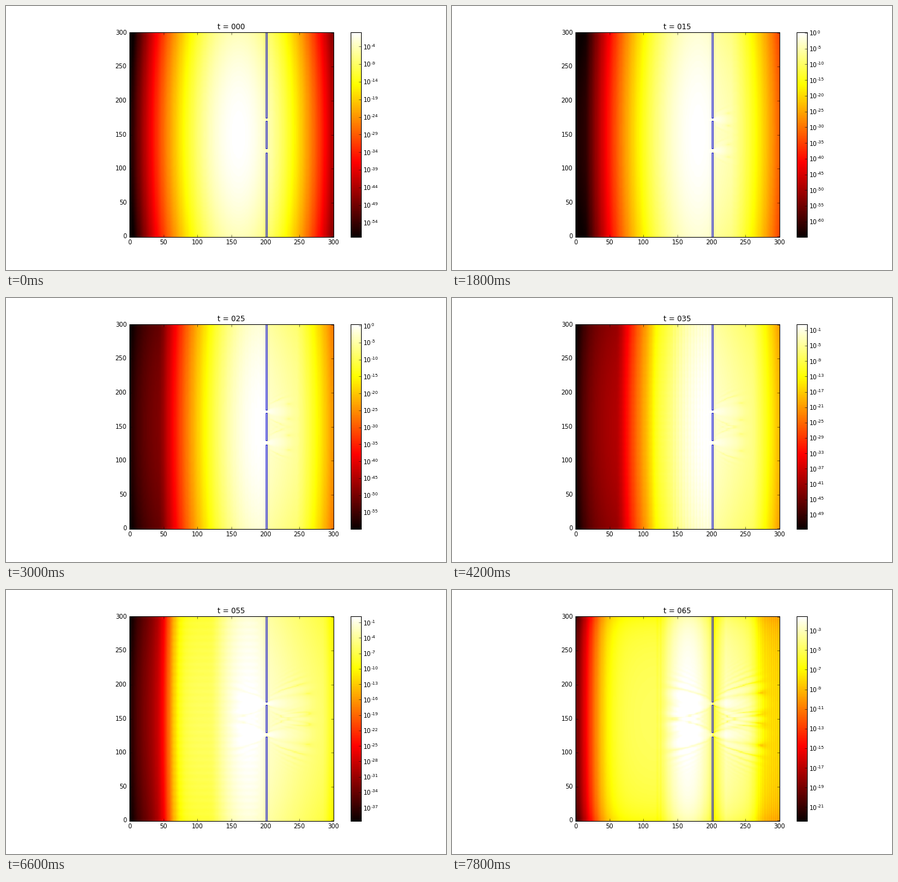
These frames come from a looping animation (720 by 432 pixels, 8 s). A matplotlib script:

```python
import math

import matplotlib.pyplot as plt
import numpy as np
from matplotlib.animation import FuncAnimation

W, H, DPI = 720, 432, 72
STEP_MS, FRAMES, HOLD = 200, 40, 3
TOP, BOTTOM = 43.2, 378
SLITS = (172.4, 126.6)
WALL = 201.4
WAVELENGTH = 5.5
SPREAD = 58 / 160 ** 2  # decades lost per squared unit from the packet centre

plt.rcParams.update({
    "font.family": "DejaVu Sans", "font.size": 10, "axes.linewidth": 1.0,
})

X, Y = np.meshgrid(np.arange(301.0), np.arange(301.0))
U = (Y - 150) / 150


def ramp(t, start, end):
    return min(max((t - start) / (end - start), 0), 1)


def sigmoid(z):
    return 1 / (1 + np.exp(-z))


def soft_max(a, b, s=.015):
    return s * np.logaddexp(a / s, b / s)


def log_range(t):
    keys = (0, 15, 25, 35, 45, 55, 65)
    lo = np.interp(t, keys, (-58.05, -64.9, -59.97, -52.7, -45.05, -39.6, -22.4))
    hi = np.interp(t, keys, (-.02, .15, .35, .55, .44, .19, -1.57))
    return lo, hi


def packet(centre, span):
    return 1 - SPREAD * (X - centre) ** 2 / span


def left_side(t, span, late):
    """Packet that bounces off the wall, above a spreading reflected tail."""
    front = 102 - 1.5 * (t - 35) - .035 * (t - 35) ** 2
    shelf = .02 + .25 * ramp(t, 10, 30) * (1 - np.exp(-X / 25))
    plateau = .84 * ramp(t, 5, 30)
    rise = sigmoid((X - front) / (8 + 6 * late))
    tail = shelf + np.maximum(plateau - shelf, 0) * rise
    return soft_max(packet(min(160 + 4 * t / 3, 230 - t), span), tail)


def right_side(t, span, late):
    """Packet that leaks through the wall, capped in height."""
    tail = (.79 - .09 * late) * ramp(t, 33, 45)
    wave = np.maximum(packet(160 + 4 * t / 3, span), tail)
    cap = .95 - .0012 * (X - WALL) - .15 * late * sigmoid((X - 265) / 5)
    return np.minimum(wave, cap)


def slit_pattern(gain, reach):
    """Log intensity of a plane wave plus the waves leaving both slits."""
    d = np.abs(X - WALL)
    psi = np.ones_like(X, dtype=complex)
    for s in SLITS:
        dy = np.abs(Y - s)
        r = np.hypot(d, dy) + 1
        beam = np.exp(-(np.arctan2(dy, d) / .6) ** 2) / np.sqrt(r)
        phase = 2 * np.pi * (r - d) / WAVELENGTH
        psi += gain * beam * sigmoid((reach - r) / 5) * np.exp(1j * phase)
    return 2 * np.log10(np.abs(psi) + 1e-9)


def field(t):
    lo, hi = log_range(t)
    span = hi - lo
    late = ramp(t, 55, 65)

    out_gain = (12 + 100 * math.exp(-t / 20)) * ramp(t, 0, 10)
    passed = np.clip(slit_pattern(out_gain, 1.2 * t - 2), -1.6, 4)
    back = np.clip(slit_pattern(-8 * ramp(t, 30, 50), 2 * (t - 30)), -1, 1.5)
    n = np.where(X > WALL,
                 right_side(t, span, late) + passed / span,
                 left_side(t, span, late) + back / span)

    n -= (.04 + .03 * math.exp(-t / 8)) * U ** 2 + .04 * late * U ** 8

    # Standing waves before the wall, faint bands on the left
    standing = .008 * math.exp(-((t - 35) / 7) ** 2)
    n += standing * np.cos(2 * np.pi * X / 4.5) * ((X > 140) & (X < 200))
    bands = .004 * ramp(t, 30, 45) * (1 - late)
    n += bands * np.cos(30 * np.pi * U) * ((X > 60) & (X < 190))
    # Late ripples at the far right and a dark double streak
    n += .014 * late * np.sin(2 * np.pi * X / 3.1) * np.clip((X - 265) / 10, 0, 1)
    n -= .02 * late * np.exp(-(np.abs(X - 122.5) - 2.5) ** 2 / 2)
    return np.clip(n, 0, 1)


def log_ticks(lo, hi):
    decades = math.floor(hi) - math.ceil(lo)
    stride = 1
    while decades / stride + 1 > 15:
        stride += 1
    return [e for e in range(math.floor(lo), math.floor(hi) + 1, stride)
            if lo <= e <= hi]


def pixel_axes(left, right):
    return fig.add_axes([left / W, 1 - BOTTOM / H,
                         (right - left) / W, (BOTTOM - TOP) / H])


def show(axes, data, extent):
    return axes.imshow(data, cmap="hot", vmin=0, vmax=1, origin="lower",
                       extent=extent, aspect="auto", interpolation="nearest")


fig = plt.figure(figsize=(W / DPI, H / DPI), dpi=DPI, facecolor="white")
ax = pixel_axes(201.6, 536.4)
cax = pixel_axes(564.3, 581.04)

LIM = (-.5, 300.5)
image = show(ax, field(0), LIM * 2)
show(cax, np.linspace(0, 1, 256)[:, None], (0, 1, 0, 1))

ax.set_xticks(range(0, 301, 50))
ax.set_yticks(range(0, 301, 50))
ax.tick_params(direction="in", top=True, right=True, length=4, width=.5, pad=4)
for label in ax.get_yticklabels():
    label.set_va("center")
cax.set_xticks([])
cax.yaxis.tick_right()
cax.tick_params(direction="in", length=4, width=.5, labelright=False)
title = ax.set_title("t = 000", fontsize=12, y=1.0, pad=5)

# Barrier outline
x0, x1 = 200.5, 202.3
for y0, y1 in ((174.6, 310), (129.7, 170.1), (-10, 123.4)):
    ax.plot((x0, x1, x1, x0, x0), (y0, y0, y1, y1, y0), color="#0000c8", lw=1)
ax.set_xlim(LIM)
ax.set_ylim(LIM)

labels = [(fig.text(585 / W, 0, "10", fontsize=10),
           fig.text(597.7 / W, 0, "", fontsize=7)) for _ in range(16)]


def draw(i):
    t = 5 * (i // HOLD)
    image.set_data(field(t))
    title.set_text(f"t = {t:03d}")
    lo, hi = log_range(t)
    ticks = log_ticks(lo, hi)
    spots = [(e - lo) / (hi - lo) for e in ticks]
    cax.set_yticks(spots)
    cax.set_ylim(0, 1)
    for k, (ten, power) in enumerate(labels):
        shown = k < len(ticks)
        ten.set_visible(shown)
        power.set_visible(shown)
        if shown:
            y = H - BOTTOM + spots[k] * (BOTTOM - TOP) - 4.4
            ten.set_y(y / H)
            power.set_y((y + 3.8) / H)
            power.set_text(str(ticks[k]))
    return []


anim = FuncAnimation(fig, draw, frames=FRAMES, interval=STEP_MS,
                     repeat=True, repeat_delay=0, blit=False)
plt.show()
```
